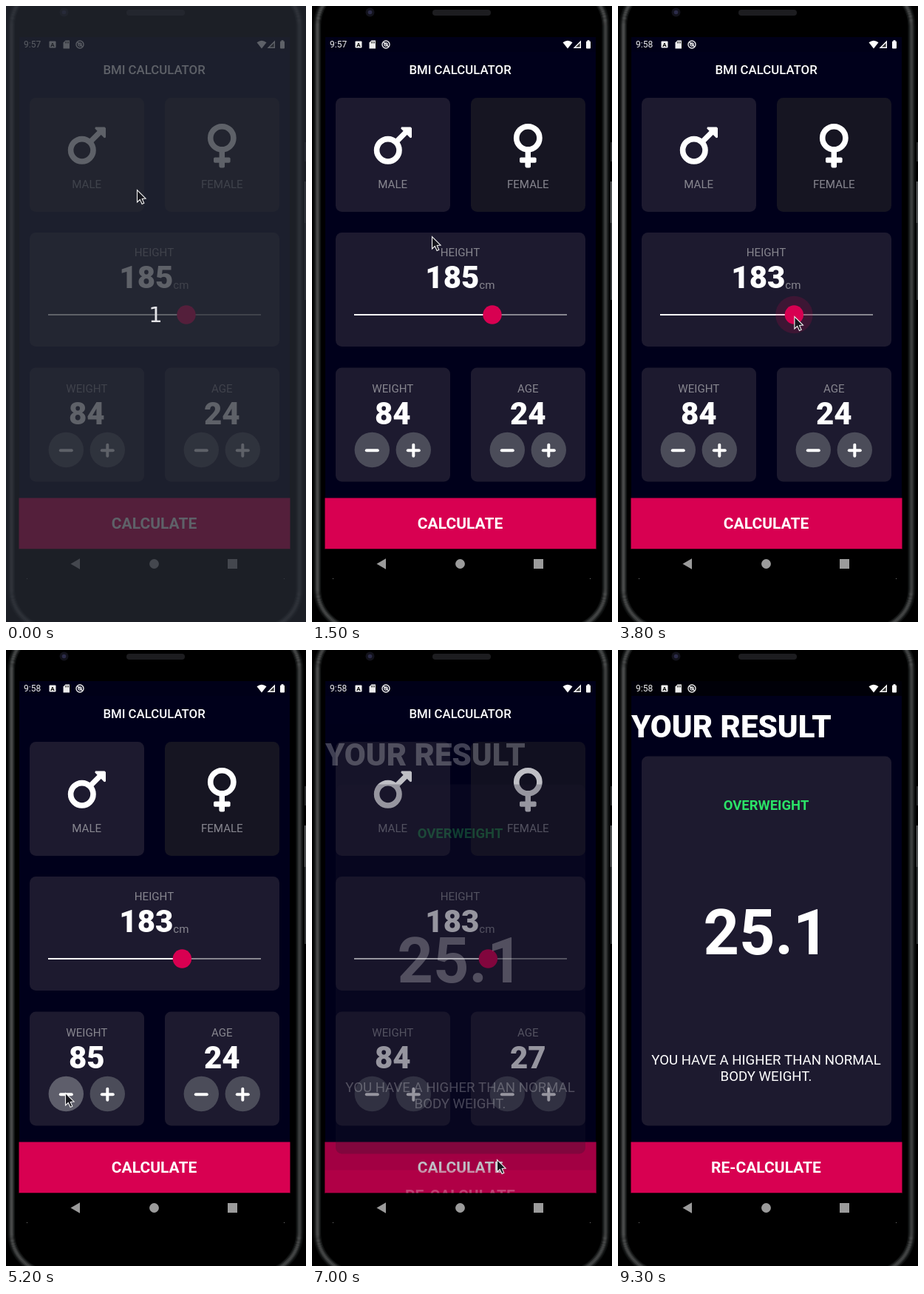
An HTML page with a canvas that plays this animation: 406 px wide and 832 px high, repeating every 9700 ms.

```html
<!DOCTYPE html>
<html lang="en">
<head>
<meta charset="utf-8">
<title>BMI calculator</title>
<style>
html, body { margin: 0; width: 100%; height: 100%; overflow: hidden; background: #000; }
canvas { display: block; width: 406px; height: 832px; }
</style>
</head>
<body>
<canvas id="stage"></canvas>
<script>
const W = 406, H = 832, LOOP = 9700, TICK = 100, MID = 200.5;
const PINK = '#d80051', CARD = '#1d1a2f', IDLE = '#161522', BACK = '#00001b';
const GREY = '#87868f', WHITE = '#fff';
const DRAG = 2500, DROP = 3900, RESULT = 7300;
const canvas = document.getElementById('stage');
const dpr = window.devicePixelRatio || 1;
canvas.width = W * dpr;
canvas.height = H * dpr;
const c = canvas.getContext('2d');

const clamp = (v, lo, hi) => Math.max(lo, Math.min(hi, v));
const progress = (t, a, b) => clamp((t - a) / (b - a), 0, 1);
const within = (t, a, b) => t >= a && t < b;
const clicks = (t, from, gap, n) => clamp(Math.floor((t - from) / gap) + 1, 0, n);

const weightAt = t => 84 + clicks(t, 4500, 200, 2) - clicks(t, 5200, 200, 2);
const ageAt = t => 24 + clicks(t, 5900, 100, 4) - clicks(t, 6300, 100, 1);

// the thumb swings right, then left, and comes back
function thumbAt(t) {
  if (t < DRAG) return 244;
  const phase = 0.305 + (Math.min(t, 3800) - 2600) * 0.004854;
  return 246 + 50 * Math.sin(Math.max(0, phase));
}

// pointer moves: start, end, x, y
const moves = [
  [200, 400, 140, 211], [800, 1500, 162, 311], [1500, 2300, 245, 425],
  [3800, 3900, 219, 460], [4000, 4300, 135, 597], [4900, 5200, 80, 598],
  [5400, 5700, 318, 600], [6200, 6300, 262, 604], [6300, 6500, 255, 650],
  [6500, 6700, 250, 688], [7200, 7300, 251, 490], [7300, 7400, 251, 351],
  [7500, 7700, 298, 186], [8000, 8400, 158, 83], [8500, 9100, 77, -3]
];
function pointerAt(t) {
  if (within(t, DRAG, DROP)) return [thumbAt(t) - (3800 - t) / 300, 419];
  let x = 177, y = 248;
  for (const [a, b, toX, toY] of moves) {
    const p = progress(t, a, b);
    x += (toX - x) * p;
    y += (toY - y) * p;
  }
  return [x, y];
}

function rect(x, y, w, h, color, r = 0) {
  c.fillStyle = color;
  c.beginPath();
  c.roundRect(x, y, w, h, r);
  c.fill();
}
function disc(x, y, r, color) {
  c.fillStyle = color;
  c.beginPath();
  c.arc(x, y, r, 0, Math.PI * 2);
  c.fill();
}
function ring(x, y, r, color, lw) {
  c.strokeStyle = color;
  c.lineWidth = lw;
  c.beginPath();
  c.arc(x, y, r, 0, Math.PI * 2);
  c.stroke();
}
function line(x1, y1, x2, y2, color, lw, cap = 'butt') {
  c.strokeStyle = color;
  c.lineWidth = lw;
  c.lineCap = cap;
  c.beginPath();
  c.moveTo(x1, y1);
  c.lineTo(x2, y2);
  c.stroke();
}
function shape(points, color) {
  c.fillStyle = color;
  c.beginPath();
  points.forEach(([x, y]) => c.lineTo(x, y));
  c.closePath();
  c.fill();
}
function text(s, x, y, size, color = WHITE, wt = 400, align = 'center', family = 'Roboto') {
  c.font = `${wt} ${size}px ${family}, sans-serif`;
  c.textAlign = align;
  c.fillStyle = color;
  c.fillText(s, x, y);
  return c.measureText(s).width;
}

function phone() {
  rect(0, 0, W, H, '#000');
  // nested outlines make the soft metal edge
  for (let i = 0; i < 10; i++) {
    const v = 12 + 62 * Math.sin(Math.PI * i / 10) ** 2;
    c.strokeStyle = `rgb(${v},${v + 2},${v + 2})`;
    c.lineWidth = 1.2;
    c.beginPath();
    c.roundRect(2.5 + i, i - 33, 399.5 - 2 * i, 880 - 2 * i, 60 - i);
    c.stroke();
  }
  rect(404, 184, 2, 26, '#2a2c2d');
  rect(404, 237, 2, 160, '#333637');
  rect(404, 237, 1, 56, '#77797a');
  rect(163, 5, 79, 8, '#1d1d20', 4);
  disc(78.5, 8.5, 6, '#12121b');
  disc(78.5, 8.5, 2.8, '#2b2b48');
}

function statusBar(t) {
  rect(18, 42, 366, 20, t < RESULT ? '#000018' : '#000008');
  text(t < 2000 ? '9:57' : '9:58', 24, 56.3, 12, '#eee', 400, 'left');
  rect(58.5, 47.5, 9, 9, '#eee', 1);
  text('A', 63, 55, 8, '#000', 700);
  shape([[80.5, 46.5], [86, 46.5], [86, 57.5], [77.5, 57.5], [77.5, 49.5]], '#eee');
  for (let x = 80.5; x < 85; x += 2) line(x, 48, x, 50.5, '#000', 0.8);
  ring(100, 52, 5, '#eee', 1.4);
  ring(100, 52, 2.2, '#eee', 1.2);
  line(97, 49, 103.5, 55, '#eee', 1.2);
  c.fillStyle = WHITE;
  c.beginPath();
  c.moveTo(346, 57.5);
  c.lineTo(339.5, 49.3);
  c.quadraticCurveTo(346, 44.2, 352.5, 49.3);
  c.fill();
  shape([[364, 46.5], [364, 57], [353.5, 57]], WHITE);
  shape([[362.6, 50], [362.6, 55.6], [357, 55.6]], '#333');
  rect(371, 47.5, 6, 10, WHITE, 1);
  rect(372.6, 46.2, 2.8, 2, WHITE);
}

function navBar() {
  rect(18, 733.5, 366, 40.5, '#000');
  shape([[87.5, 753.5], [100, 746.3], [100, 760.7]], '#9b9b9b');
  disc(MID, 753.5, 6.4, '#9b9b9b');
  rect(300, 747, 13, 13, '#9b9b9b');
  for (const x of [28, 376]) rect(x, 773, 1, 1, '#777');
}

function maleIcon() {
  ring(102.8, 194.8, 15.2, WHITE, 7.6);
  line(113, 184.5, 127, 170.5, WHITE, 7.4);
  shape([[121, 163.5], [133.5, 163.5], [135, 165], [135, 177.5], [133, 178.2], [120.3, 165.4]], WHITE);
}
function femaleIcon() {
  ring(292.3, 178.3, 15.6, WHITE, 7.6);
  line(292.3, 196, 292.3, 216.5, WHITE, 7.4);
  rect(288.6, 210, 7.4, 8.5, WHITE, 1.8);
  rect(281, 204.4, 22.6, 7.4, WHITE, 1.8);
}

function roundButton(x, plus, lit) {
  disc(x, 599.5, 23.7, lit ? '#5e5e6b' : '#4b4c59');
  line(x - 7.5, 600.3, x + 7.5, 600.3, WHITE, 4, 'round');
  if (plus) line(x, 592.8, x, 607.8, WHITE, 4, 'round');
}

function counter(x, label, value, minusLit, plusLit) {
  rect(x, 488.5, 155, 154, CARD, 8.4);
  const mid = x + 77.3;
  text(label, mid, 522, 15.1, GREY);
  text(value, mid, 565, 42, WHITE, 900);
  roundButton(mid - 28, false, minusLit);
  roundButton(mid + 28, true, plusLit);
}

function heightCard(t) {
  const x = thumbAt(t);
  rect(32, 306, 338, 154, CARD, 8.4);
  text('HEIGHT', MID, 338, 15.1, GREY);
  const w = text(Math.round(120 + (x - 57) / 2.88), 153.3, 381, 42, WHITE, 900, 'left');
  text('cm', 153.3 + w, 381.5, 15.1, GREY, 400, 'left');
  line(x, 417, 345, 417, GREY, 1.8);
  line(57, 417, x, 417, WHITE, 2);
  if (within(t, DRAG, DROP)) disc(x, 417, 25.2, 'rgba(216,0,81,.17)');
  disc(x, 417, 12.7, PINK);
}

function bottomButton(label) {
  rect(17.5, 664.6, 367, 69, PINK);
  text(label, MID, 706, 21, WHITE, 700);
}

function inputPage(t) {
  rect(18, 62, 366, 671, BACK);
  text('BMI CALCULATOR', MID, 92, 16.8, WHITE, 500);
  rect(32, 124, 155, 154, t < 600 ? IDLE : CARD, 8.4);
  rect(215, 124, 155, 154, IDLE, 8.4);
  maleIcon();
  femaleIcon();
  text('MALE', 109.2, 246.3, 15.1, GREY);
  text('FEMALE', 292.3, 246.3, 15.1, GREY);
  heightCard(t);
  counter(32, 'WEIGHT', weightAt(t), within(t, 5200, 5500), within(t, 4500, 4800));
  counter(215, 'AGE', ageAt(t), within(t, 6300, 6400), within(t, 5900, 6300));
  bottomButton('CALCULATE');
}

function resultPage() {
  rect(18, 62, 366, 671, BACK);
  text('YOUR RESULT', 18, 118, 42, WHITE, 900, 'left');
  rect(32, 143.5, 338, 499, CARD, 8.4);
  text('OVERWEIGHT', MID, 215.7, 18.5, '#2be267', 700);
  text('25.1', MID, 411, 84.5, WHITE, 700);
  text('YOU HAVE A HIGHER THAN NORMAL', MID, 559.5, 18.6);
  text('BODY WEIGHT.', MID, 581.5, 18.6);
  bottomButton('RE-CALCULATE');
}

function screen(t) {
  c.save();
  c.beginPath();
  c.rect(17, 62, 368, 672);
  c.clip();
  // the result fades in while sliding up
  const p = progress(t, 6900, RESULT);
  if (p < 1) inputPage(t);
  if (p > 0) {
    c.globalAlpha = p;
    c.translate(0, 90 * (1 - p) ** 3);
    resultPage();
  }
  c.restore();
}

function cursor(t) {
  if (t >= 9300) return;
  const [x, y] = pointerAt(t);
  c.save();
  c.translate(x + 0.5, y + 0.5);
  c.beginPath();
  [[0, 0], [0, 16.5], [3.8, 13], [6.6, 19], [9.3, 17.8], [6.7, 12], [11.6, 11.6]]
    .forEach(([a, b]) => c.lineTo(a, b));
  c.closePath();
  c.fillStyle = '#15151c';
  c.fill();
  c.strokeStyle = '#f2f2f2';
  c.lineWidth = 1.1;
  c.stroke();
  c.restore();
}

function draw(now) {
  const t = Math.floor((now % LOOP) / TICK) * TICK;
  c.setTransform(dpr, 0, 0, dpr, 0, 0);
  phone();
  statusBar(t);
  screen(t);
  navBar();
  if (t < TICK) {
    rect(0, 0, W, H, 'rgba(38,42,52,.74)');
    text('1', 202.5, 427, 29, '#e4e4e8', 400, 'center', '"DejaVu Sans"');
  }
  cursor(t);
}

let start;
function tick(now) {
  start ??= now;
  draw(Math.max(0, now - start));
  requestAnimationFrame(tick);
}
draw(0);
requestAnimationFrame(tick);
</script>
</body>
</html>
```
